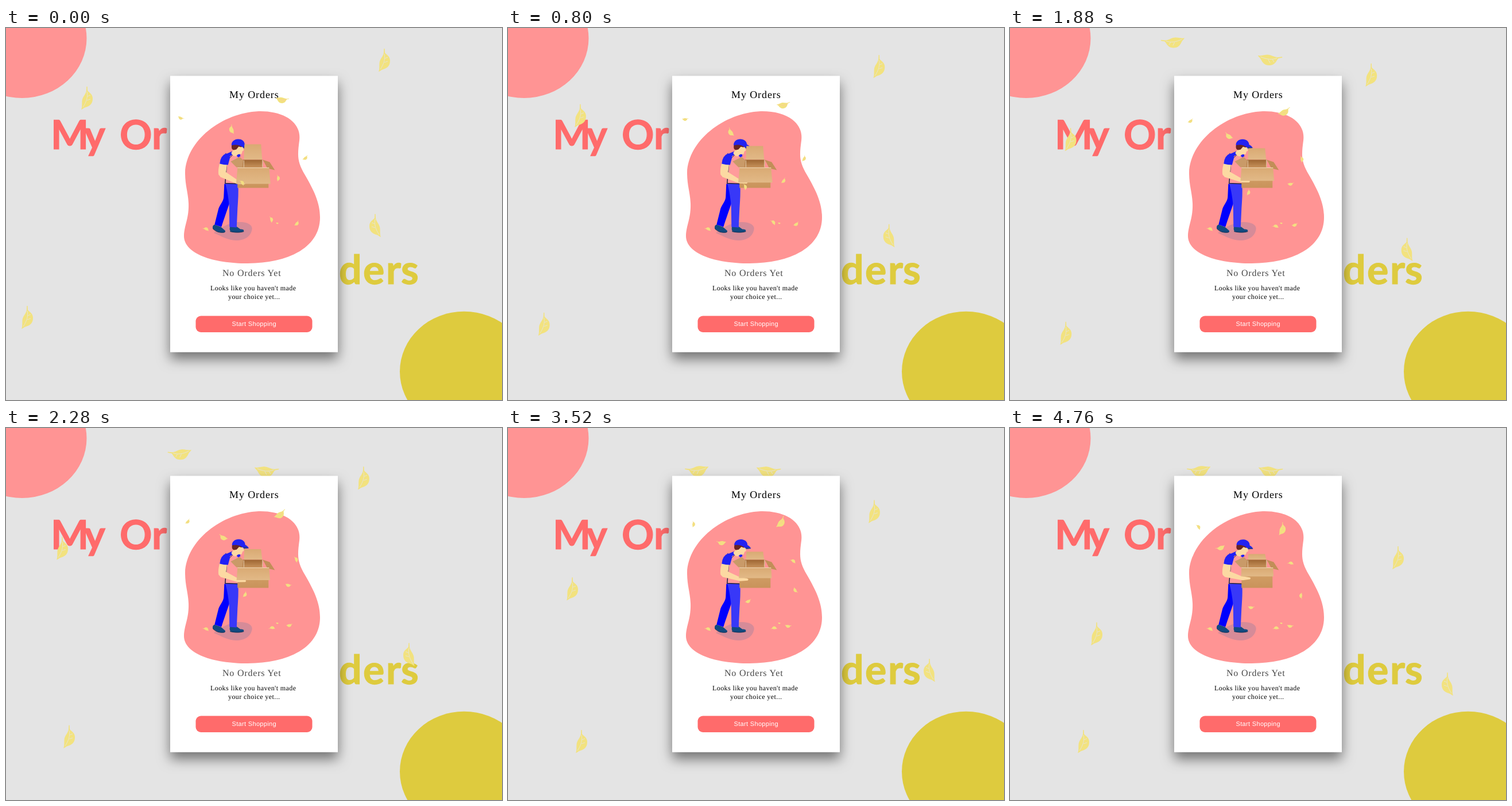
Recreate the animation shown at these times as an HTML page. Size 864 by 648 pixels, loop 4.8 s.

```html
<!DOCTYPE html>
<html lang="en">
<head>
<meta charset="utf-8">
<title>My Orders</title>
<style>
html, body { margin: 0; width: 100%; height: 100%; overflow: hidden; background: #e4e4e4; }
svg { display: block; width: 100vw; height: 100vh; text-rendering: geometricPrecision; }
.big { font: 700 70px Lato, sans-serif; stroke-width: 1.2; }
.serif { font-family: "Liberation Serif", serif; }
.sans { font-family: "Liberation Sans", sans-serif; }
</style>
</head>
<body>
<svg viewBox="0 0 864 648" xmlns="http://www.w3.org/2000/svg">
  <defs>
    <filter id="shadow" x="-20%" y="-20%" width="140%" height="140%">
      <feDropShadow dx="0" dy="12" stdDeviation="11" flood-color="#000" flood-opacity=".5"/>
    </filter>
    <linearGradient id="inside" x2="0" y2="1">
      <stop stop-color="#9d6632"/><stop offset="1" stop-color="#c8935c"/>
    </linearGradient>
    <linearGradient id="board" x2="0" y2="1">
      <stop stop-color="#d9aa73"/><stop offset="1" stop-color="#e2b987"/>
    </linearGradient>
    <linearGradient id="body" x2="0" y2="1">
      <stop stop-color="#d5a36a"/><stop offset="1" stop-color="#c9935b"/>
    </linearGradient>
    <g id="leaf">
      <path fill="#f2e27f" d="M-.7-20H.7L1-13C4-9 10-7 10 1C10 11 4 14-2 16C-6 17-8 20-10 20C-8 16-9 12-8.500 5C-8-2-2-6-1-13Z"/>
      <path fill="none" stroke="currentColor" stroke-width=".8" d="M0-11C2-2-1 7-7 16M1-3L6-5M0 4L6 2"/>
    </g>
  </defs>

  <rect width="864" height="648" fill="#e4e4e4"/>
  <ellipse cx="28" cy="18" rx="112.500" ry="104" fill="#ff9494"/>
  <ellipse cx="798" cy="598.500" rx="112" ry="104.800" fill="#decb3e"/>
  <text class="big" x="78 136 198 198 254" y="211" fill="#ff6b6b" stroke="#ff6b6b">My Or</text>
  <text class="big" x="580 622 662 688" y="446" fill="#decb3e" stroke="#decb3e">ders</text>
  <g id="outer" color="#e4e4e4"></g>

  <rect x="286" y="83.500" width="292" height="481" fill="#fff" filter="url(#shadow)"/>
  <g class="serif">
    <text x="389" y="122" font-size="18" letter-spacing=".9">My Orders</text>
    <text x="377" y="432" font-size="16" letter-spacing=".8" fill="#484848">No Orders Yet</text>
    <text x="356" y="456.500" font-size="12" letter-spacing=".42">Looks like you haven't made</text>
    <text x="387" y="471.500" font-size="12" letter-spacing=".42">your choice yet...</text>
  </g>
  <rect x="330.500" y="501.500" width="203" height="28.500" rx="9" fill="#ff6b6b"/>
  <text class="sans" x="393.500" y="519" font-size="11" letter-spacing=".33" fill="#fff">Start Shopping</text>

  <path fill="#ff9494" d="M440 145C484 144 515 164 511 196C507 226 508 234 522 258C535 281 547 303 547 330C547 382 492 410 421 410C360 410 309 393 310 361C311 342 319 331 318 305C317 285 312 275 312 252C314 196 376 148 440 145Z"/>
  <path fill="#d68b98" d="M362 357C372 350 385 339 407 338C425 338 431 346 428 353C425 366 410 371 400 370C385 369 378 364 362 357Z"/>

  <g transform="translate(-.7 -.5)">
    <g fill="#124a80">
      <path d="M364 343C361 344 360 347 361 350C365 353 370 357 378 357C382 357 384 355 382 353L375 347Z"/>
      <path d="M391 346C390 349 390 353 392 355C399 357 408 357 414 355C417 352 413 351 409 351L402 346Z"/>
      <path fill="none" stroke="#0b2c50" d="M361 350C366 355 372 358 382 356M391 355C400 357 408 357 415 355"/>
    </g>
    <path fill="#0000ff" d="M381 272H396L390 305C386 318 380 334 376 347L364 343L371 315C374 307 380 302 380 294Z"/>
    <path fill="#3838f8" d="M383 272H405C406 287 405 300 404 315L402.500 348L390 347L389.500 313C389 302 387 288 383 272Z"/>

    <path fill="#ff9b9b" d="M386 221L402 217L407 225V271H382L385 239Z"/>
    <path fill="none" stroke="#1c2140" stroke-width="1.500" d="M385 238L382.500 271L407 272"/>
    <path fill="#2020f5" d="M382 221L394 215.500L397 220L389 225ZM402 222L408 217L409 224L405 226Z"/>
    <path fill="none" stroke="#202046" d="M383 219L391 226L396 221"/>

    <g id="head">
      <path fill="#fcd9a2" d="M397 207L413 207L415 213.500L412.500 215L411 220L405 220.500L401 224C397 224 394 221 393 218L398 212Z"/>
      <path fill="#692524" d="M394 204C400 202 410 203 414 207L410 208L406 207L402 212L398 213C394 213 393 209 394 204Z"/>
      <path fill="#2222f2" d="M393.500 205C393 198 399 194 405 194C411 194 416 197 416.500 203C419 204 422 206 423 208.500L415 210C409 204 401 203 393.500 205Z"/>
      <path fill="#28407e" d="M414 207Q419 206 423 208.500L415 210Z"/>
    </g>

    <path id="lid" fill="url(#board)"/>
    <path fill="url(#inside)" d="M413 230H448V244H411Z"/>
    <path fill="none" stroke="#ecd4b4" d="M415 231V243M447.500 230V243"/>
    <path fill="#c99a68" d="M392 233L408 225L414 231L412 244L402 243Z"/>
    <path fill="#c28e58" d="M448 230L460 234L469 248L456 245Z"/>
    <path fill="url(#body)" d="M404 244H458V279H404Z"/>
    <path fill="#fcd9a2" d="M373 236H386L384 252C382 260 375 262 371 256C370 250 371 243 373 236Z"/>
    <path id="arm" fill="#fcd9a2" d="M371 252L383 251L402 264L416 269.500Q419 271 416 273L403 272L374 260Z"/>
    <path id="front" fill="url(#board)"/>
    <path fill="none" stroke="#f0d9b8" d="M404 244H459"/>
    <path fill="#2020f5" d="M384 219Q391 220 391 226L387.500 239Q380 239 373 237Q374 223 384 219Z"/>
  </g>

  <g id="inner" color="#ffc09c"></g>
</svg>
<script>
const LOOP = 4800, STEP = 40, TURN = 2840, END = 4600;
const $ = id => document.getElementById(id);
const mix = (a, b, p) => a + (b - a) * p;
const leaves = [];

// keys: [time, x, y, angle]
function leaf(layer, size, flip, ...keys) {
  const el = document.createElementNS("http://www.w3.org/2000/svg", "use");
  el.setAttribute("href", "#leaf");
  $(layer).append(el);
  leaves.push({ el, size, flip, keys });
}

function pose(keys, t) {
  const i = keys.findIndex(k => k[0] > t);
  if (i < 0) return keys[keys.length - 1];
  if (i === 0) return keys[0];
  const a = keys[i - 1], b = keys[i], p = (t - a[0]) / (b[0] - a[0]);
  return a.map((v, n) => mix(v, b[n], p));
}

leaf("outer", 1, 1, [0, 141, 122, 0], [TURN, 87.5, 231, 0], [END, 151, 358.5, 0]);
leaf("outer", 1, 1, [0, 659, 56, 0], [TURN, 614, 95, 0], [END, 676, 226, 0]);
leaf("outer", 1, -1, [0, 643, 344, 0], [END, 762, 446, 0]);
leaf("outer", 1, 1, [0, 37, 504, 0], [TURN, 128, 546, 0]);
leaf("outer", 1, -1, [0, 194, -73, -82], [TURN, 328, 74, -82]);
leaf("outer", 1.03, 1, [0, 448, -60, 80], [2220, 455, 75, 80]);

leaf("inner", .57, 1, [0, 482, 125, 80], [END, 474.5, 175.5, 2]);
leaf("inner", .27, 1, [0, 305, 157, 95], [TURN, 320, 164, 10], [END, 328, 172, -50]);
leaf("inner", .41, -1, [0, 393, 176, 0], [TURN, 374, 194, -60], [END, 366, 209, -95]);
leaf("inner", .28, 1, [0, 522, 226, 35], [TURN, 501, 229, -55], [END, 488.5, 235.5, -95]);
leaf("inner", .28, 1, [0, 474, 261, -15], [TURN, 497, 277, 110], [END, 507, 293, 165]);
leaf("inner", .28, 1, [0, 411, 269, -50], [TURN, 418, 294.5, 30], [END, 420.5, 312.5, 80]);
leaf("inner", .28, 1, [0, 462, 333, -30], [1480, 461.5, 342.5, -80], [2320, 463, 348.5, -105]);
leaf("inner", .13, 1, [0, 473, 340, 85]);
leaf("inner", .28, 1, [0, 507, 340, 25], [3300, 488.5, 345, 80]);
leaf("inner", .28, 1, [0, 348, 350, -80]);

function draw(t) {
  const p = Math.min(t / END, 1);
  for (const { el, size, flip, keys } of leaves) {
    const [, x, y, angle] = pose(keys, t);
    el.setAttribute("transform", `translate(${x} ${y}) rotate(${angle}) scale(${size * flip} ${size})`);
  }
  const top = mix(203, 220, p), low = mix(272, 259, p), out = mix(2.5, .8, p);
  $("lid").setAttribute("d", `M415 230L416 ${top}H445L447 230Z`);
  $("front").setAttribute("d", `M404 244H459L${459 + out} ${low}H${404 - out}Z`);
  $("head").setAttribute("transform", `rotate(${6 * p} 399 221)`);
  $("arm").setAttribute("transform", `rotate(${-12 * p} 375 256)`);
}

function tick() {
  const t = performance.now() % LOOP;
  draw(Math.floor(t / STEP) * STEP);
  requestAnimationFrame(tick);
}
tick();
</script>
</body>
</html>
```
